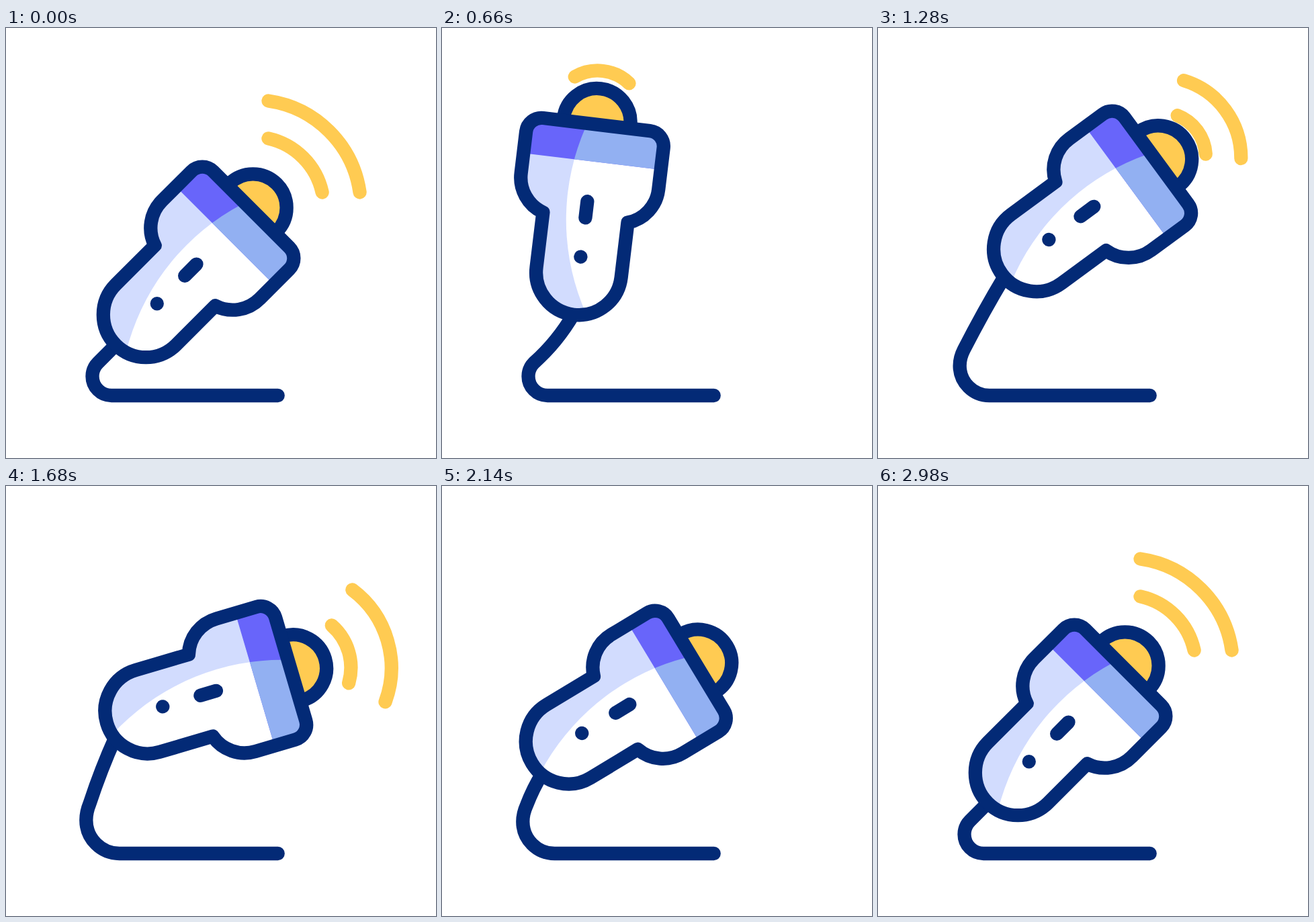
Animation, 640 px wide and 640 px high, one loop 3600 ms. Source, as an HTML page:

```html
<!DOCTYPE html>
<html lang="en">
<head>
<meta charset="utf-8">
<title>Handheld scanner</title>
<style>
  html, body { margin: 0; width: 100%; height: 100%; overflow: hidden; background: #fff; }
  svg { display: block; width: 100vw; height: 100vh; }
  .line { fill: none; stroke: #032a76; stroke-width: 20.3; stroke-linecap: round; stroke-linejoin: round; }
  .wave { fill: none; stroke: #ffcb52; stroke-width: 20.3; stroke-linecap: round; }
</style>
</head>
<body>
<svg viewBox="0 0 640 640">
  <defs>
    <path id="shell" d="M-80 3.6H80A23 23 0 0 1 103 26.6V88.4A57 57 0 0 1 63.5 143V225.3A63.5 63.5 0 0 1 -63.5 225.3V143A57 57 0 0 1 -103 88.4V26.6A23 23 0 0 1 -80 3.6Z"/>
    <clipPath id="inside"><use href="#shell"/></clipPath>
    <clipPath id="band"><rect x="-120" y="-10" width="240" height="69"/></clipPath>
  </defs>
  <path id="cord" class="line"/>
  <g id="device">
    <path id="outer" class="wave"/>
    <path id="inner" class="wave"/>
    <circle class="line" r="50" style="fill:#ffcb52"/>
    <g clip-path="url(#inside)">
      <rect x="-120" y="-10" width="240" height="320" fill="#d2dcfe"/>
      <circle cx="312.5" cy="109" r="343" fill="#fff"/>
      <g clip-path="url(#band)">
        <rect x="-120" y="-10" width="240" height="80" fill="#6865fa"/>
        <circle cx="312.5" cy="109" r="343" fill="#92b0f2"/>
      </g>
    </g>
    <use href="#shell" class="line"/>
    <path class="line" d="M0 119V143.5M0 202V202.01"/>
  </g>
</svg>
<script>
const LOOP = 3600;
const BASE = 225.3; // from the bulb to the centre of the rounded grip
const REST = 45;    // resting angle

// Key poses: time, angle, grip x, grip y, wave scale
const POSES = [
  [0, REST, 208.3, 426.7, 1],
  [540, 2.5, 206, 366, .56],
  [660, 6.83, 203.6, 363.7, .424],
  [840, 18, 206, 359, .2],
  [1280, 53.6, 235.6, 328.8, .747],
  [1540, 76, 228, 321, 1],
  [1680, 73.6, 211, 334.8, .905],
  [2140, 58.9, 188.3, 379.9, .2],
  [2480, 50.1, 192.2, 410, .64],
  [2700, 46.3, 204, 424, .965],
  [2980, REST, 208.3, 426.7, 1]
];

// Smooth interpolation that never overshoots its keys.
function sample(t, col) {
  const last = POSES.length - 1;
  if (t >= POSES[last][0]) return POSES[last][col];
  const i = POSES.findIndex(p => p[0] > t) - 1;
  const secant = k => (POSES[k + 1][col] - POSES[k][col]) / (POSES[k + 1][0] - POSES[k][0]);
  const slope = k => {
    if (k === 0 || k === last) return 0;
    const a = secant(k - 1), b = secant(k);
    return a * b <= 0 ? 0 : 2 * a * b / (a + b);
  };
  const h = POSES[i + 1][0] - POSES[i][0];
  const u = (t - POSES[i][0]) / h, v = 1 - u;
  return v * v * (1 + 2 * u) * POSES[i][col] + u * u * (3 - 2 * u) * POSES[i + 1][col]
    + h * u * v * (v * slope(i) - u * slope(i + 1));
}

const [cord, device, outer, inner] =
  ["cord", "device", "outer", "inner"].map(id => document.getElementById(id));
const rad = deg => deg * Math.PI / 180;

function drawWave(el, radius, half, scale) {
  const r = radius * scale;
  const x = r * Math.sin(rad(half));
  const y = -15 * (1 - scale) - r * Math.cos(rad(half));
  el.setAttribute("d", `M${-x} ${y}A${r} ${r} 0 0 1 ${x} ${y}`);
}

// Tilting past the rest angle lifts the corner; tilting back makes the cord sag.
function drawCord(angle, gripX, gripY) {
  const over = angle - REST;
  const lift = over > 0 ? 1 - Math.exp(-over / 6.5) : 0;
  const sag = over > 0 ? -3 * lift : -.2 * over;
  const aim = rad(Math.min(angle, REST + .3 * (355 - gripY) * lift * lift));
  const bendX = 157 + 12 * lift;
  const leftX = 128.5 - 9.3 * lift, leftY = 518.5 - 21.5 * lift;
  const px = 136.8 - 12.3 * lift, py = 498.3 - 26.3 * lift;
  const ex = gripX - 62 * Math.sin(aim), ey = gripY + 62 * Math.cos(aim);
  const mx = (px + ex) / 2 + .75 * sag, my = (py + ey) / 2 + .65 * sag;
  const k = .552;
  cord.setAttribute("d", `M404.7 547H${bendX}`
    + `C${bendX - k * (bendX - leftX)} 547 ${leftX} ${leftY + k * (547 - leftY)} ${leftX} ${leftY}`
    + `Q${leftX} ${506.7 - 21.7 * lift} ${px} ${py}Q${mx} ${my} ${ex} ${ey}`);
}

function draw(t) {
  const [angle, x, y, scale] = [1, 2, 3, 4].map(c => sample(t, c));
  device.setAttribute("transform", `translate(${x} ${y}) rotate(${angle}) translate(0 ${-BASE})`);
  drawWave(outer, 160.6, 36.8, scale);
  drawWave(inner, 105.5, 32.5, scale - .12 * (1 - scale ** 30)); // trails until fully open
  drawCord(angle, x, y);
}

const start = performance.now();
function tick() {
  draw((performance.now() - start) % LOOP);
  requestAnimationFrame(tick);
}
tick();
</script>
</body>
</html>
```
